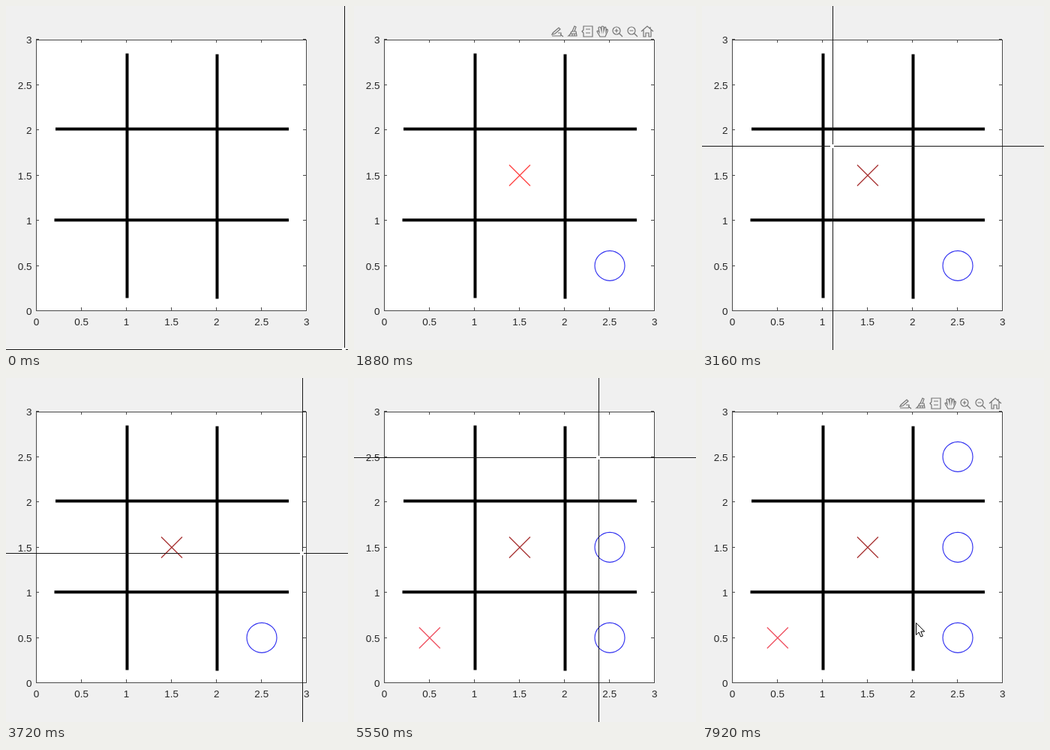
These frames come from a looping animation (456 px wide and 460 px high, 7.99 s). An HTML page with a canvas:

```html
<!DOCTYPE html>
<html lang="en">
<head>
<meta charset="utf-8">
<title>Noughts and crosses</title>
<style>
  html, body { margin: 0; width: 100%; height: 100%; overflow: hidden; background: #f0f0f0; }
  canvas { display: block; }
</style>
</head>
<body>
<canvas id="stage" width="456" height="460"></canvas>
<script>
const ctx = document.getElementById('stage').getContext('2d');
const W = 456, H = 460, LOOP = 7990, STEP = 67;
const AXES = { left: 40, top: 45, right: 400, bottom: 407 };

// Data coordinates (0..3) to pixels
const px = v => AXES.left + .5 + v * 120.1;
const py = v => 408 - v * 121;

// Pointer paths: [time, x, y, easing towards the next key]
const CROSSHAIR = [
  [0, 451, 459], [200, 451, 459, 'smooth'], [1000, 351, 353],
  [1070, 351, 353, 'smooth'], [1390, 341, 347],
  [2010, 341, 347, 'in'], [2630, 202, 207, 'out'], [2900, 168, 186],
  [3030, 168, 186, 'smooth'], [3720, 395, 234, 'out'], [3850, 397, 235],
  [3860, 397, 235, 'smooth'], [4190, 342, 231],
  [4670, 342, 231, 'smooth'], [5000, 344, 225],
  [5140, 344, 225, 'smooth'], [5550, 326, 106, 'out'], [5830, 341, 104]
];
const ARROW = [
  [6370, 341, 104, 'smooth'], [6640, 307, 352],
  [7040, 307, 352, 'smooth'], [7660, 285, 329], [7920, 285, 327]
];
const CROSSHAIR_SPANS = [[0, 1740], [2010, 4330], [4730, 6370]];
const CLICKS = [[1670, 1740, 341, 347], [4190, 4330, 341, 232], [6230, 6370, 341, 105]];
const NOUGHTS = [[1740, 2.5, .5], [4330, 2.5, 1.5], [6370, 2.5, 2.5]];
const CROSSES = [[1880, 1.5, 1.5], [4660, .5, .5]];

const EASE = {
  smooth: u => u * u * (3 - 2 * u),
  in: u => u * u * (2 - u),
  out: u => 1 - (1 - u) ** 2
};

const within = (t, [from, to]) => t >= from && t < to;

function along(path, t) {
  let i = path.length - 1;
  while (i > 0 && path[i][0] > t) i--;
  const [t0, x0, y0, ease] = path[i];
  if (!ease) return [x0, y0];
  const [t1, x1, y1] = path[i + 1];
  const elapsed = Math.floor((t - t0) / STEP) * STEP;
  const u = EASE[ease](elapsed / (t1 - t0));
  return [Math.round(x0 + (x1 - x0) * u), Math.round(y0 + (y1 - y0) * u)];
}

function line(x0, y0, x1, y1) {
  ctx.beginPath();
  ctx.moveTo(x0, y0);
  ctx.lineTo(x1, y1);
  ctx.stroke();
}

function disc(x, y, r) {
  ctx.beginPath();
  ctx.arc(x, y, r, 0, Math.PI * 2);
}

function drawAxes() {
  const { left, top, right, bottom } = AXES;
  ctx.fillStyle = '#f0f0f0';
  ctx.fillRect(0, 0, W, H);
  ctx.fillStyle = '#fff';
  ctx.fillRect(left, top, right - left, bottom - top);
  ctx.strokeStyle = '#484848';
  ctx.lineWidth = 1;
  ctx.strokeRect(left + .5, top + .5, right - left, bottom - top);

  ctx.fillStyle = '#262626';
  ctx.font = '13.5px "Liberation Sans", Arial, sans-serif';
  for (let v = 0; v <= 3; v += .5) {
    const x = Math.floor(px(v)) + .5;
    const y = Math.round(py(v)) - .5;
    line(x, top, x, top + 4);
    line(x, bottom, x, bottom - 4);
    line(left, y, left + 4, y);
    line(right, y, right - 4, y);
    ctx.textAlign = 'center';
    ctx.fillText(v, px(v), 427);
    ctx.textAlign = 'right';
    ctx.fillText(v, 34.5, py(v) + 5);
  }
}

function drawGrid() {
  ctx.strokeStyle = '#000';
  ctx.lineWidth = 4;
  line(161.5, 63.5, 161.5, 390.5);
  line(281.5, 64.5, 281.5, 391.5);
  line(66, 164.5, 377, 164.5);
  line(64.5, 286.2, 377, 286.2);
}

function drawMarks(t) {
  ctx.lineWidth = 1.15;
  ctx.strokeStyle = '#3030f0';
  for (const [start, col, row] of NOUGHTS) {
    if (t < start) continue;
    disc(px(col) + .3, py(row) - .2, 20);
    ctx.stroke();
  }
  ctx.lineWidth = 1.3;
  CROSSES.forEach(([start, col, row], i) => {
    if (t < start) return;
    const x = px(col) + .3, y = py(row);
    ctx.strokeStyle = i ? '#ee5060' : t < 3090 ? '#ff4444' : '#a83434';
    line(x - 14, y - 14, x + 14, y + 14);
    line(x - 14, y + 14, x + 14, y - 14);
  });
}

// Toolbar glyphs, each centred on its own origin
const LENS = 'M4 -1A5 5 0 1 1 -6 -1A5 5 0 1 1 4 -1M2.5 2.5L7 7M-3.5 -1H1.5';
const ICONS = [
  [271, 'M-6 2L2 -5L4 -3L-3 3L-7 4ZM-7 6H5M1 2H5V6M4 4L8 7'],
  [292, 'M2 -7L4 -6L2 0H-1ZM-2 0H4L5 6H-6Q-3 4 -2 0M-3 3H4M-1 3V6M2 3V6'],
  [311, 'M-5 -7H7V7H-5V2L-7 0L-5 -2ZM-2 -3H4M-2 2H4'],
  [331, 'M-3 7L-7 0Q-6 -2 -4 1L-5 -5Q-4 -7 -2 -5L-1 -1L-1 -6Q0 -8 2 -6V-1L3 -5Q5 -7 5 -4V0L6 -3Q8 -3 7 0L4 7Z'],
  [351, LENS + 'M-1 -3.5V1.5'],
  [371, LENS],
  [391, 'M-8 0L0 -7L8 0M-5 -2V7H-2V2H2V7H5V-2M4 -6V-4']
].map(([x, d]) => [x, new Path2D(d)]);

function drawToolbar() {
  ctx.strokeStyle = '#747474';
  ctx.lineWidth = 1.2;
  for (const [x, glyph] of ICONS) {
    ctx.save();
    ctx.translate(x, 34);
    ctx.stroke(glyph);
    ctx.restore();
  }
}

function drawCrosshair([x, y]) {
  ctx.fillStyle = '#161616';
  ctx.fillRect(x, 0, 1, H);
  ctx.fillRect(0, y, W, 1);
  ctx.fillStyle = '#fff';
  ctx.fillRect(x - 3, y - 2, 5, 5);
}

const POINTER = new Path2D('M.5 .5V16.5L4.2 13L6.8 19L9.4 18L6.8 12H11.8Z');

function drawArrow([x, y]) {
  ctx.save();
  ctx.translate(x, y);
  ctx.fillStyle = '#fff';
  ctx.fill(POINTER);
  ctx.strokeStyle = '#000';
  ctx.lineWidth = 1;
  ctx.stroke(POINTER);
  ctx.restore();
}

function draw(t) {
  drawAxes();
  drawGrid();
  drawMarks(t);
  if (CROSSHAIR_SPANS.some(span => within(t, span))) drawCrosshair(along(CROSSHAIR, t));
  else drawToolbar();

  for (const click of CLICKS) {
    if (!within(t, click)) continue;
    ctx.fillStyle = 'rgba(255, 255, 0, .52)';
    disc(click[2], click[3], 15);
    ctx.fill();
  }
  if (t >= ARROW[0][0]) drawArrow(along(ARROW, t));
}

const start = performance.now();
function tick() {
  draw((performance.now() - start) % LOOP);
  requestAnimationFrame(tick);
}
tick();
</script>
</body>
</html>
```
